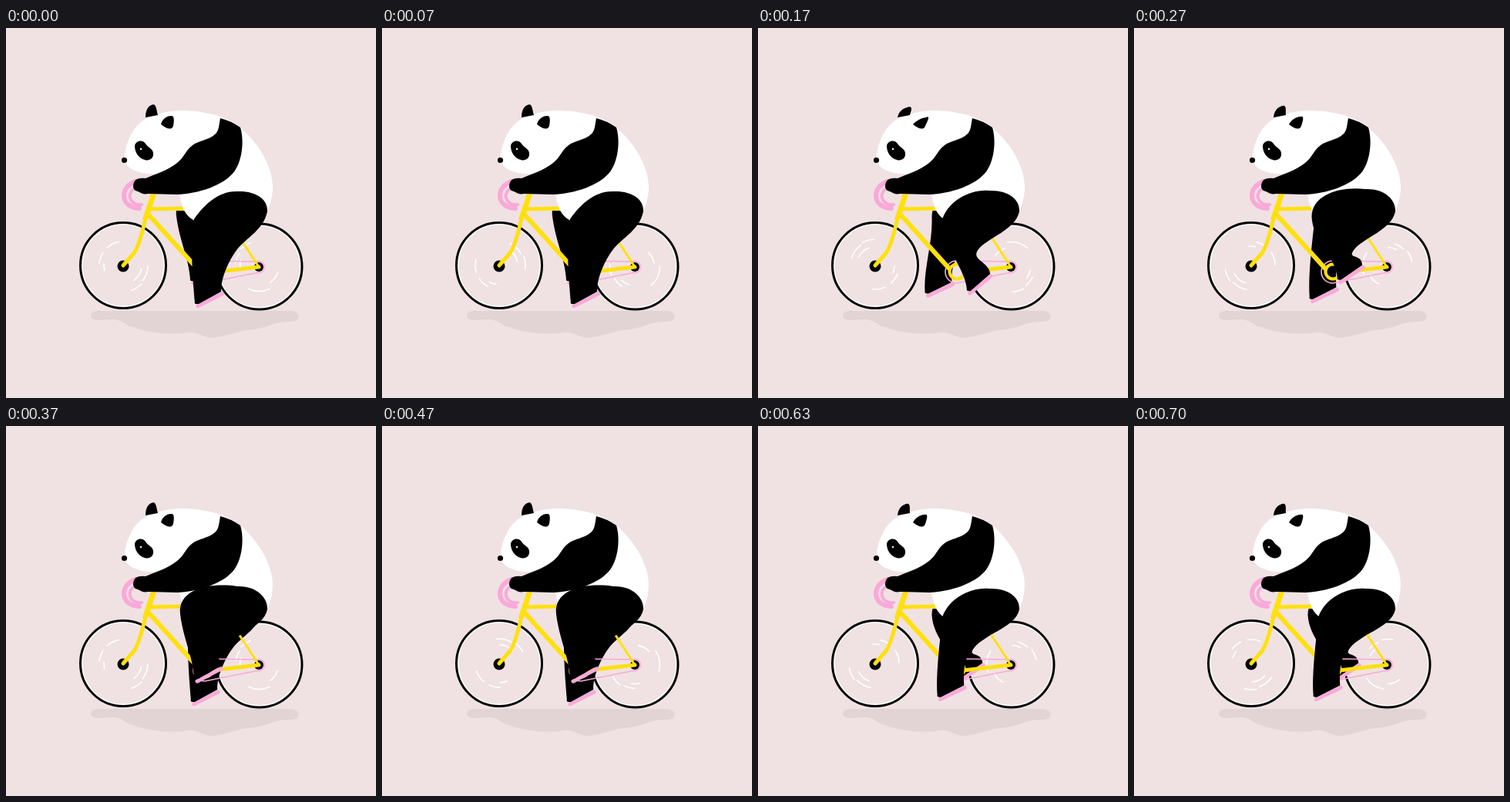
Recreate the animation shown at these times as an HTML page with a canvas. Size 480 by 480 pixels, loop 730 ms.

```html
<!DOCTYPE html>
<html>
<head>
<meta charset="utf-8">
<style>
html, body { margin: 0; height: 100%; overflow: hidden; background: #f0e2e2; }
canvas { display: block; }
</style>
</head>
<body>
<canvas width="480" height="480"></canvas>
<script>
const ctx = document.querySelector('canvas').getContext('2d');
const LOOP = 730, TURN_STEPS = 11, RAD = Math.PI / 180;
const BLACK = '#000', WHITE = '#fff', YELLOW = '#ffe00d', PINK = '#f9a9d9';

// Six held pedalling poses: foot x, y, slope in degrees, and x of the knee hollow
const POSES = [
  [263, 352, -26, 300],
  [287, 332, -38, 286],
  [281, 319, -32, 286],
  [262, 322, -27, 282],
  [240, 339, -24, 270],
  [251, 346, -25, 278],
];
const EAR_TILT = [0, 1, .5];

// Speed marks: radius, start and end angle in degrees
const FRONT_MARKS = [[31, 185, 212], [31, 229, 260], [25, 165, 185], [32, 2, 38], [24, 10, 55], [34, 45, 72]];
const REAR_MARKS = [[32, 65, 115], [25, 18, 55], [31, 190, 215], [25, 175, 200], [33, 225, 250]];

ctx.lineCap = ctx.lineJoin = 'round';

function fill(d, color) {
  ctx.fillStyle = color;
  ctx.fill(new Path2D(d));
}

function stroke(d, color, width) {
  ctx.strokeStyle = color;
  ctx.lineWidth = width;
  ctx.stroke(new Path2D(d));
}

function arc(x, y, r, color, width, from = 0, to = 360) {
  ctx.beginPath();
  ctx.arc(x, y, r, from * RAD, to * RAD);
  ctx.strokeStyle = color;
  ctx.lineWidth = width;
  ctx.stroke();
}

function disc(x, y, r, color) {
  ctx.beginPath();
  ctx.arc(x, y, r, 0, 360 * RAD);
  ctx.fillStyle = color;
  ctx.fill();
}

function wheel(x, y, marks, turn) {
  arc(x, y, 53.5, WHITE, 2);
  arc(x, y, 55.5, BLACK, 3);
  for (const [r, from, to] of marks) arc(x, y, r, WHITE, 1.6, from + turn, to + turn);
}

function leg(pose, dx) {
  const [fx, fy, slope, bx] = POSES[pose % 6];
  const c = Math.cos(pose * 60 * RAD);
  const ux = 18 * Math.cos(slope * RAD), uy = 18 * Math.sin(slope * RAD);
  const tx = fx - ux, ty = fy - uy, hx = fx + ux, hy = fy + uy;
  const kx = 235 + 9 * c, ky = 246 + 2 * c, by = 287;
  ctx.save();
  ctx.translate(dx, 0);
  stroke(`M${tx + 2} ${ty + 1}L${hx + 1} ${hy + 1}`, PINK, 5);
  fill(`M339 238C340 222 324 ${209 + 2 * c} 300 ${210 + 2 * c}
    C${272 + 4 * c} ${207 + 4 * c} ${kx + 4 + 8 * c} ${ky - 26 + 8 * c} ${kx} ${ky}
    C${kx - 1 - 5 * c} ${ky + 32} ${tx - 4} ${ty - 32} ${tx - 2} ${ty - 5}
    Q${tx - 3} ${ty - 1} ${tx + 3} ${ty - 2}L${hx} ${hy - 2}
    C${hx - 1} ${hy - 18} ${bx - 11} ${by + 14} ${bx} ${by}
    C${bx + 12} ${by - 15} 334 262 339 238Z`, BLACK);
  ctx.restore();
}

function bike() {
  disc(152, 309, 7.5, BLACK);
  disc(328, 310, 6, BLACK);
  arc(328, 310, 7.5, PINK, 1.5, -110, 110);
  stroke('M328 303L258 302A15 14.5 0 0 0 258 331L328 317', PINK, 1.6);
  stroke('M169 199C148 204 146 233 173 234', PINK, 6);
  stroke('M164 210C156 218 163 231 176 229', PINK, 4);
  stroke('M191 217L181 247', YELLOW, 7);
  stroke('M181 247Q173 282 166 292L152 308', YELLOW, 5);
  stroke('M187 235L230 234M267 317L328 310', YELLOW, 5);
  stroke('M183 240L248 312', YELLOW, 6);
  stroke('M302 270L328 310', YELLOW, 3);
  arc(258, 316, 9.5, YELLOW, 4);
}

function ears(tilt) {
  const at = (x, y, dx, dy) => `${x + dx * tilt} ${y + dy * tilt} `;
  fill(`M181 116C${at(181, 107, 2, 0)}${at(184, 101, 5, 3)}${at(190, 99.5, 5, 3)}
    C${at(195, 98, 7, 3)}${at(195, 106, 3, 3)}197 113Z`, BLACK);
  fill(`M201 125C${at(203, 118, 2, 3)}${at(208, 114, 2, 3)}${at(214, 114, 4, 2)}
    C${at(219, 113, 5, 0)}${at(218, 121, 2, 0)}217 127C215 133 208 131 201 125Z`, BLACK);
}

function body(tilt) {
  fill(`M153 172C155 150 164 124 186 116C207 106 235 105 258 110C278 113 293 120 304 129
    C328 150 345 178 346 205C346 230 335 250 318 258L245 250Q227 242 225 212L216 186
    C196 192 168 190 158 179Z`, WHITE);
  ears(tilt);
  fill(`M278 117Q291 120 304 129C309 145 307 170 297 185C283 205 248 215 222 216L184 215
    C177 217 173 212 168 211C164 209 164 202 168 197Q173 194 181 195C190 191 210 185 222 175
    C232 167 232 160 242 152C250 146 262 146 271 138C276 134 276 128 278 117Z`, BLACK);
  fill(`M167 153C168 146 177 144 181 150C184 155 190 156 191 162C192 169 186 173 180 171
    C172 169 167 161 167 153Z`, BLACK);
  disc(175, 157, 1.2, WHITE);
  disc(153.5, 171.5, 3.6, BLACK);
}

function draw(step) {
  const pose = Math.floor(step * 3 / TURN_STEPS);
  const turn = -step * 360 / TURN_STEPS;
  ctx.clearRect(0, 0, 480, 480);
  fill(`M118 367H370C382 368 384 380 370 381C350 380 340 388 323 391C300 392 290 400 266 402
    C254 401 248 393 235 395C210 399 180 394 164 388C153 385 152 378 138 378
    C120 379 110 380 110 373Q110 368 118 367Z`, '#e2d4d4');
  wheel(152, 308, FRONT_MARKS, turn);
  wheel(328.5, 309.5, REAR_MARKS, turn);

  // The hip of the far leg stays behind the body
  ctx.save();
  ctx.beginPath();
  ctx.rect(0, 237, 480, 243);
  ctx.clip();
  leg(pose + 3, -5);
  ctx.restore();

  bike();
  body(EAR_TILT[pose % 3]);
  leg(pose, 0);
}

function tick() {
  const tens = Math.floor(performance.now() % LOOP / 10);
  draw(Math.floor((tens * 3 + 1) / 10));
  requestAnimationFrame(tick);
}
tick();
</script>
</body>
</html>
```
